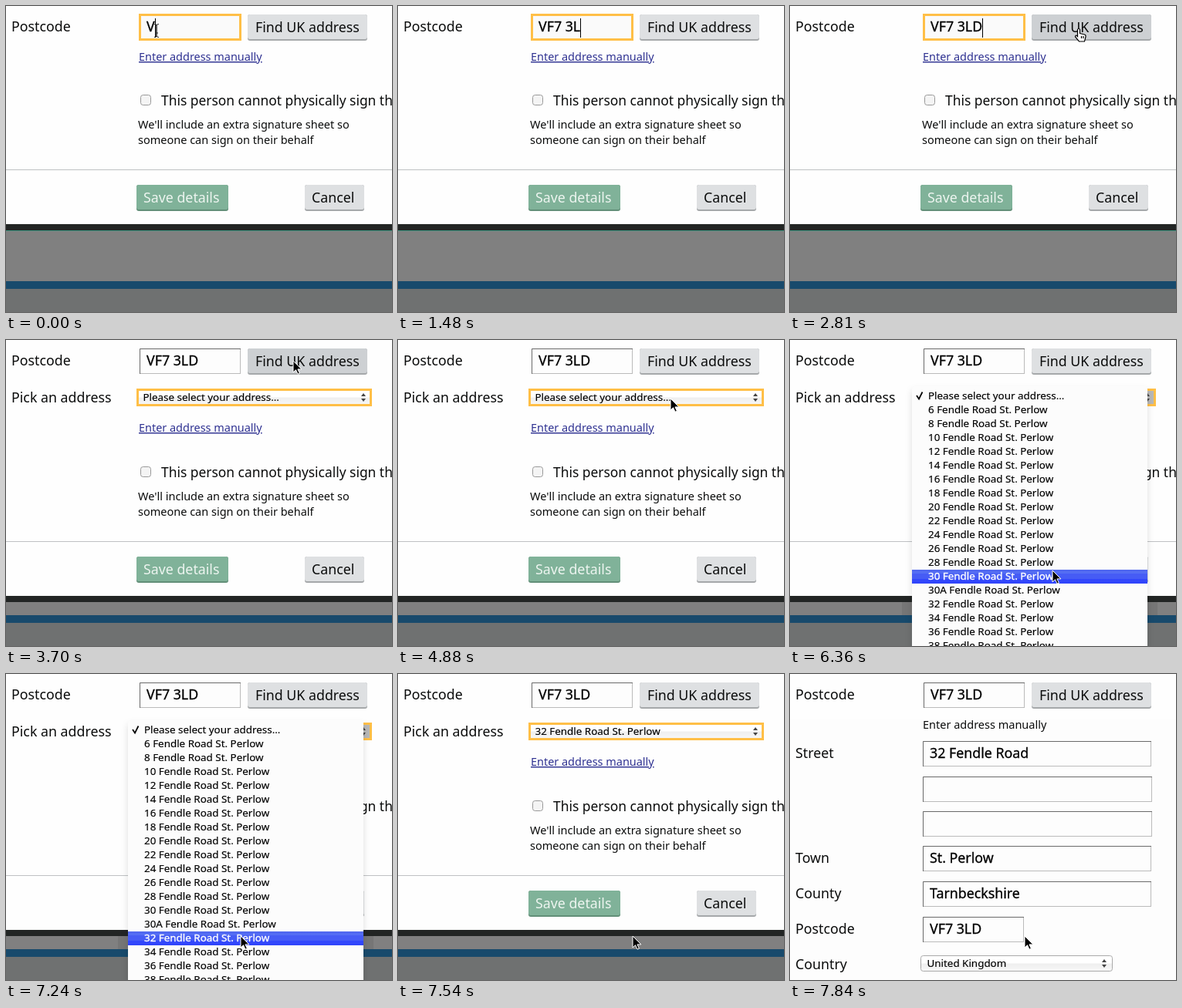
Recreate the animation shown at these times as an HTML page. Size 500 by 397 pixels, loop 8000 ms.

```html
<!DOCTYPE html>
<html lang="en">
<head>
<meta charset="utf-8">
<title>Address lookup</title>
<style>
  html, body { margin: 0; width: 100%; height: 100%; overflow: hidden; background: #fefefe; }
  svg { display: block; }
  text { font: 17.8px "Noto Sans", "Open Sans", sans-serif; fill: #0b0c0c; white-space: pre; }
  .long { font-size: 17.4px; }
  .small { font-size: 14.5px; }
  .menu { font-size: 13.4px; fill: #000; stroke: #000; stroke-width: .15; }
  .link { font-size: 14.45px; fill: #2e3191; text-decoration: underline; }
  .value { fill: #000; stroke: #000; stroke-width: .3; }
  .pale { fill: #edf5f0; }
  .on { fill: #fff; stroke: #fff; stroke-width: .35; }
  .panel { filter: drop-shadow(0 5px 4px #0002); }
</style>
</head>
<body>
<svg id="stage" width="500" height="397" viewBox="0 0 500 397">
  <defs>
    <linearGradient id="blue" x2="0" y2="1">
      <stop stop-color="#4f66ee"/><stop offset=".3" stop-color="#5670f6"/>
      <stop offset=".3" stop-color="#465cf5"/><stop offset=".65" stop-color="#465cf5"/>
      <stop offset=".65" stop-color="#3348fb"/><stop offset="1" stop-color="#3044fb"/>
    </linearGradient>
    <linearGradient id="gloss" x2="0" y2="1">
      <stop offset=".45" stop-color="#fff"/><stop offset=".55" stop-color="#efefef"/><stop offset="1" stop-color="#f8f8f8"/>
    </linearGradient>
  </defs>
  <g id="scene"></g>
</svg>
<script>
const LOOP = 8000;
const CODE = 'VF7 3LD', STREET = 'Fendle Road', TOWN = 'St. Perlow', COUNTY = 'Tarnbeckshire';
const PROMPT = 'Please select your address...';
const numbers = [6, 8, 10, 12, 14, 16, 18, 20, 22, 24, 26, 28, 30, '30A', 32, 34, 36, 38];
const options = [PROMPT, ...numbers.map(n => `${n} ${STREET} ${TOWN}`)];
const CHOSEN = 15;

const BLUR = 3110, PICK = 3410, OPEN = 5180, FADE = 7380, CLOSE = 7530, FILLED = 7680;
const keyTimes = [0, 140, 590, 890, 1180, 1480, 1630];
// time, shape, x, y
const pointer = [
  [0, 'beam', 195, 32], [140, '', 0, 0],
  [2230, 'beam', 200, 32], [2380, 'beam', 275, 29], [2530, 'hand', 431, 28],
  [2680, 'hand', 392, 29], [2810, 'hand', 374, 29], [3560, 'arrow', 372, 27],
  [4290, 'arrow', 371, 32], [4440, 'arrow', 367, 48], [4580, 'arrow', 360, 63],
  [4730, 'arrow', 355, 72], [4880, 'arrow', 353, 76],
  [5470, 'arrow', 351, 221], [5620, 'arrow', 349, 290],
  [6360, 'arrow', 340, 299], [6510, 'arrow', 326, 315],
  [6650, 'arrow', 312, 330], [6800, 'arrow', 304, 340]
];
// time, highlighted row (-1 while the choice blinks)
const highlight = [[0, 0], [5470, 6], [5620, 12], [6360, 13], [6510, 14], [6800, CHOSEN], [7090, -1], [7240, CHOSEN]];

const at = (steps, t) => steps.filter(s => s[0] <= t).pop();
const rect = (x, y, w, h, fill, more = '') =>
  `<rect x="${x}" y="${y}" width="${w}" height="${h}" fill="${fill}" ${more}/>`;
const path = (d, more) => `<path d="${d}" ${more}/>`;
const text = (x, y, s, cls = '') => `<text x="${x}" y="${y}" class="${cls}">${s}</text>`;
const ring = (x, y, w, h) =>
  rect(x + 1.5, y + 1.5, w - 3, h - 3, 'none', 'stroke="#ffbf47" stroke-width="3"');

function button(x, y, w, label, textX, fill = '#dee0e2', edge = '#a5a8aa', cls = '') {
  return rect(x, y, w, 34, edge, 'rx="3"') + rect(x, y, w, 32, fill, 'rx="3"') +
    text(textX, y + 23, label, cls);
}

function field(x, y, w, value = '') {
  return rect(x + .5, y + .5, w - 1, 32, '#fdfdfd', 'stroke="#bbb"') +
    path(`M${x + .5} ${y + 33}v-32.5h${w - .5}`, 'fill="none" stroke="#6a6a6a"') +
    text(x + 9, y + 22, value, 'value');
}

function select(x, y, w, label, focused, fill = 'url(#gloss)') {
  const ax = x + w - 11, ay = y + 11.5;
  return rect(x + .5, y + 1.5, w - 1, 20, fill, 'stroke="#aaa" rx="3"') +
    (focused ? ring(x, y, w, 23) : '') +
    path(`M${ax - 3} ${ay - 1.5}l3-4 3 4zm0 3l3 4 3-4z`, 'fill="#444"') +
    text(x + 8.5, y + 15.5, label, 'menu');
}

function backdrop(bottom) {
  return rect(0, 0, 500, 397, '#fefefe') + rect(0, bottom, 500, 114, '#808080') +
    rect(0, bottom, 500, 8, '#222524') +
    (bottom < 300 ? rect(0, 291, 500, 1, '#3c8f7c') : '') +
    rect(0, 357, 500, 10, '#184a6c') + rect(0, 367, 500, 30, '#6f7171');
}

function lowerForm(dy) {
  return text(172, 71 + dy - (dy ? 1 : 0), 'Enter address manually', 'link') +
    rect(174.5, 115.5 + dy, 13, 13, '#f4f4f4', 'rx="3" stroke="#999"') +
    text(201, 129 + dy, 'This person cannot physically sign the form', 'long') +
    text(171, 159 + dy, "We'll include an extra signature sheet so", 'small') +
    text(171, 179 + dy, 'someone can sign on their behalf', 'small') +
    rect(0, 212 + dy, 500, 1, '#bfc1c3') +
    button(169, 232 + dy, 119, 'Save details', 178, '#80b299', '#628f78', 'pale') +
    button(387, 232 + dy, 77, 'Cancel', 396);
}

function codeRow(t) {
  const typed = CODE.slice(0, keyTimes.filter(k => k <= t).length);
  const hover = t >= 2530 && t < 4440;
  const box = t < BLUR
    ? rect(173, 11, 131, 33, '#fafafa') + ring(172, 10, 133, 35) +
      `<text id="code" x="182" y="33" class="value">${typed}</text>` +
      rect(0, 16, 1, 25, '#000', 'id="caret"')
    : field(173, 11, 131, CODE);
  return text(7, 33, 'Postcode') + box +
    button(313, 11, 155, 'Find UK address', 323, hover ? '#cdd0d3' : '#dee0e2');
}

function menu(t) {
  const row = at(highlight, t)[1];
  return `<g opacity="${t < FADE ? 1 : .5}">` +
    rect(145, 340, 331, 17, '#000', 'opacity=".08"') +
    rect(158, 60, 305, 350, '#fcfcfc', 'rx="4" class="panel"') +
    (row < 0 ? '' : rect(158, 64 + 18 * row, 305, 18, 'url(#blue)')) +
    path('M164 72l3 4.5 4.5-9', 'fill="none" stroke-width="1.7" stroke="' + (row ? '#000' : '#fff') + '"') +
    options.map((s, i) => text(179, 77 + 18 * i, s, i === row ? 'menu on' : 'menu')).join('') + '</g>';
}

function filledForm() {
  const labels = [['Street', 109], ['Town', 245], ['County', 291], ['Postcode', 337], ['Country', 383]];
  return rect(0, 59, 500, 338, '#fdfdfd') + text(172, 71, 'Enter address manually', 'small') +
    labels.map(([s, y]) => text(7, y, s)).join('') +
    field(172, 87, 296, '32 ' + STREET) + field(172, 133, 297) + field(172, 178, 297) +
    field(172, 223, 296, TOWN) + field(172, 269, 296, COUNTY) + field(172, 315, 131, CODE) +
    select(169, 364, 249, 'United Kingdom');
}

const shapes = {
  '': '',
  beam: path('M-3-8.5q3 0 3 2v13q0 2-3 2M3-8.5q-3 0-3 2v13q0 2 3 2M-2 3h4', 'fill="none" stroke="#222"'),
  hand: path('M-1.5 1.5q1.5-2.5 3 0v5l6 1.5q2 .5 1.5 3l-1.5 6h-7l-5-6q0-2.5 2-1.5l1 1zM3.5 10v3M6 10v3',
    'fill="#fff" stroke="#000" stroke-width="1.2"'),
  arrow: path('M0 0v15l3.5-3.3 2.5 5.5 2.4-1-2.5-5.3h5z', 'fill="#000" stroke="#fff"')
};

function draw(t) {
  const [, shape, x, y] = at(pointer, t);
  const open = t >= OPEN && t < CLOSE;
  let s = t < PICK ? backdrop(283) + lowerForm(0)
    : t < FILLED ? backdrop(332) + lowerForm(49) + text(7, 81, 'Pick an address') +
      select(169, 63, 305, t < FADE ? PROMPT : options[CHOSEN], true, open ? '#b8b8b8' : undefined)
    : rect(0, 0, 500, 397, '#fefefe') + filledForm();
  s += codeRow(t);
  if (open) s += menu(t);
  return s + `<g transform="translate(${x} ${y})">${shapes[shape]}</g>`;
}

const scene = document.getElementById('scene');
let last = '', start;
function tick(now) {
  start ??= now;
  const next = draw((now - start) % LOOP);
  if (next !== last) {
    scene.innerHTML = last = next;
    const code = document.getElementById('code');
    if (code) document.getElementById('caret').setAttribute('x', Math.round(182 + code.getComputedTextLength()));
  }
  requestAnimationFrame(tick);
}
requestAnimationFrame(tick);
</script>
</body>
</html>
```
